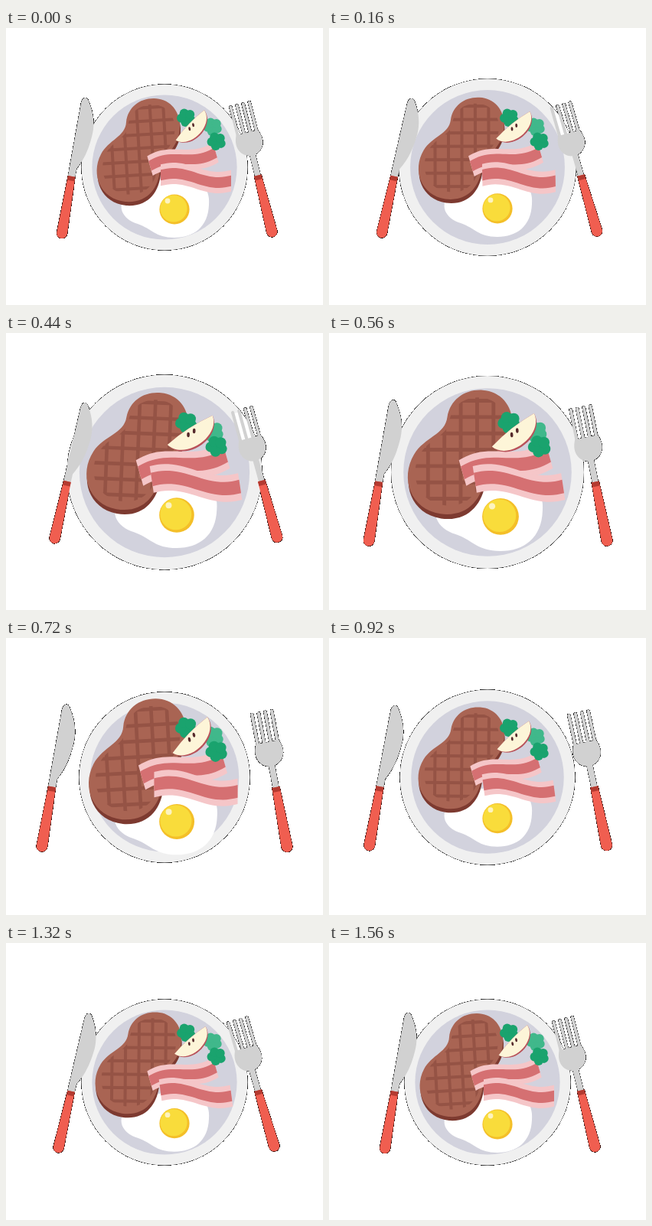
Recreate the animation shown at these times as an HTML page with a canvas. Size 414 by 362 pixels, loop 1.6 s.

```html
<!DOCTYPE html>
<html lang="en">
<head>
<meta charset="utf-8">
<title>Breakfast plate</title>
<style>
  html, body { margin: 0; height: 100%; overflow: hidden; background: #fff; }
  canvas { display: block; }
</style>
</head>
<body>
<canvas id="stage" width="414" height="362"></canvas>
<script>
const LOOP = 1600, STEP = 40;
const METAL = '#d1d1d1';
const canvas = document.getElementById('stage');
const ctx = canvas.getContext('2d', { willReadFrequently: true });

const steakShape = new Path2D('M193,92C174,92 159,104 157,123C156,142 134,146 124,165C110,192 124,224 156,227C186,229 199,208 201,186C203,166 228,158 227,126C226,106 212,92 193,92Z');
const eggWhite = new Path2D('M-5,-42C25,-47 48,-32 45,-6C44,23 25,37 0,37C-25,37 -30,25 -48,19C-68,13 -78,-5 -60,-22C-45,-37 -25,-37 -5,-42Z');
const appleSkin = new Path2D('M-27,0C-23,25 23,25 27,0Q0,-4 -27,0Z');
const appleFlesh = new Path2D('M-27,0C-22,22.5 22,22.5 27,0Q0,-4 -27,0Z');
const blade = new Path2D('M-5,110L-4,8C-3,-2 3,-2 6,4C15,18 19,32 18.5,46C17,72 12,85 5,98V110Z');
const forkHead = new Path2D('M-15,41C-23,58 -14,70 -4,72V104H4V72C14,70 23,58 15,41Z');
const forkGaps = new Path2D('M-13,4H13V43H-13Z');

// Smooth rise from a to b and smooth fall from c to d
function ease(t, from, to) {
  const u = Math.min(1, Math.max(0, (t - from) / (to - from)));
  return u * u * (3 - 2 * u);
}
const pulse = (t, a, b, c, d) => ease(t, a, b) - ease(t, c, d);

function fill(color, path) {
  ctx.fillStyle = color;
  ctx.fill(path);
}

function line(color, width, x1, y1, x2, y2) {
  ctx.strokeStyle = color;
  ctx.lineWidth = width;
  ctx.lineCap = 'round';
  ctx.beginPath();
  ctx.moveTo(x1, y1);
  ctx.lineTo(x2, y2);
  ctx.stroke();
}

function ellipse(color, x, y, rx, ry = rx, turn = 0) {
  const path = new Path2D();
  path.ellipse(x, y, rx, ry, turn, 0, 2 * Math.PI);
  fill(color, path);
}

function place(x, y, degrees, scale, draw) {
  ctx.save();
  ctx.translate(x, y);
  ctx.rotate(degrees * Math.PI / 180);
  ctx.scale(scale, scale);
  draw();
  ctx.restore();
}

function drawPlate() {
  ellipse('#f0f0f0', 0, 0, 108.5);
  ellipse('#d2d2dd', 0, 0, 94.6);
}

function drawEgg() {
  fill('#fff', eggWhite);
  ellipse('#f4bf28', 0, 0, 19.6);
  ellipse('#f9dc3b', -1, -1, 17.6);
  ellipse('#fdf3c0', -9, -11, 3.4);
}

function drawSteak() {
  place(-174.5, -152, 0, 1, () => fill('#7d3a30', steakShape));
  place(-175.5, -157, 0, 1, () => fill('#a96453', steakShape));
  // Grill marks stay inside a smaller copy of the outline
  const inset = new Path2D();
  inset.addPath(steakShape, new DOMMatrix([0.87, 0, 0, 0.87, -152.5, -137]));
  ctx.clip(inset);
  ctx.rotate(-0.06);
  for (let p = -70; p <= 70; p += 17.5) {
    line('#955345', 4, p - 2, -80, p - 2, 80);
    line('#955345', 4, -80, p, 80, p);
  }
}

function band(half) {
  const path = new Path2D();
  const y = x => 6 * Math.sin(x / 18.5);
  for (let x = -46; x <= 46; x += 4) path.lineTo(x, y(x) - half);
  for (let x = 46; x >= -46; x -= 4) path.lineTo(x, y(x) + half);
  return path;
}

function drawBacon(shear) {
  ctx.transform(1, 0, shear, 1, 0, 0);
  fill('#f5c6c8', band(14));
  fill('#d57072', band(7));
}

function drawBroccoli(color) {
  ellipse(color, 0, 0, 6);
  for (let i = 0; i < 5; i++) {
    const a = i * 2 * Math.PI / 5 + 0.5;
    ellipse(color, 6.5 * Math.cos(a), 6 * Math.sin(a), 6);
  }
}

function drawApple() {
  fill('#b9525a', appleSkin);
  fill('#fdf5d8', appleFlesh);
  for (const x of [-4, 3]) ellipse('#55292b', x, 3, 1.4, 2.5, 0.6);
}

function drawHandle(top, end) {
  fill('#f05e50', new Path2D(`M-5,${top}L-7.3,${end - 7.3}A7.3,7.3 0 0 0 7.3,${end - 7.3}L5,${top}Z`));
  fill('#b43a30', new Path2D(`M-5,${top}H5V${top + 6}H-5Z`));
}

// Cutlery turns about the middle of its length
function drawKnife() {
  ctx.translate(0, -97.5);
  fill(METAL, blade);
  drawHandle(109, 195);
}

function drawFork() {
  ctx.translate(0, -92.5);
  // Gaps show white where the fork lies on the plate
  ctx.globalCompositeOperation = 'source-atop';
  fill('#fff', forkGaps);
  ctx.globalCompositeOperation = 'source-over';
  for (let x = -12.9; x < 13; x += 8.6) line(METAL, 4.2, x, 2.5, x, 46);
  fill(METAL, forkHead);
  drawHandle(100, 185);
}

// Soft edge pixels turn opaque over black, giving the fine dotted outline
function hardenEdges() {
  const image = ctx.getImageData(0, 0, canvas.width, canvas.height), d = image.data;
  for (let i = 0; i < d.length; i += 4) {
    const a = d[i + 3];
    if (a === 0 || a === 255) continue;
    for (let c = 0; c < 3; c++) d[i + c] *= a / 255;
    d[i + 3] = a < 16 ? 0 : 255;
  }
  ctx.putImageData(image, 0, 0);
}

function render(t) {
  const plate = 1 + 0.175 * pulse(t, 0, 380, 530, 700) + 0.056 * pulse(t, 640, 800, 900, 1100);
  const swell = pulse(t, 240, 540, 640, 900);
  const food = 1 + 0.22 * swell;
  const strip = pulse(t, 80, 400, 640, 900);
  const apple = 1 + 0.3 * pulse(t, 80, 400, 560, 1000);
  const firstTilt = pulse(t, 0, 300, 400, 760);
  const secondTilt = pulse(t, 760, 900, 1320, 1560);
  const turn = 6 * firstTilt + 4 * secondTilt;
  const shear = 0.15 * pulse(t, 80, 460, 560, 720) + 0.13 * secondTilt;
  const out = pulse(t, 360, 640, 720, 1320);
  const lean = 5 * pulse(t, 0, 300, 340, 560) + 3 * pulse(t, 800, 1200, 1320, 1560);

  ctx.clearRect(0, 0, canvas.width, canvas.height);
  place(207, 182, 0, plate, drawPlate);
  place(220 + 4 * swell, 237 + 4 * swell - turn / 3, 0, food, drawEgg);
  place(175.5 - swell, 157 - 0.7 * turn - 2 * swell, turn, food, drawSteak);
  place(231, 171.5, -16, 0.95 + 0.3 * strip, () => drawBacon(0));
  place(248, 196, 0, 1 + 0.24 * strip, () => drawBacon(shear));
  place(235.5, 117, 0, food, () => drawBroccoli('#1aa36e'));
  place(270, 129, 0, food, () => drawBroccoli('#40b88b'));
  place(275, 148, 0, food, () => drawBroccoli('#1aa36e'));
  place(240.3, 126.8, 14 * firstTilt + 5 * secondTilt - 46.5, apple, drawApple);
  place(87.5 - 25.5 * out, 183, 9.6 + lean, 0.957 + 0.045 * out, drawKnife);
  place(327 + 24 * out, 185.5 + 2 * out, -14.1 - 0.7 * lean + 3.5 * out, 0.975 + 0.04 * out, drawFork);
  hardenEdges();
}

const start = performance.now();
function tick() {
  const t = (performance.now() - start) % LOOP;
  render(Math.floor(t / STEP) * STEP);
  requestAnimationFrame(tick);
}
tick();
</script>
</body>
</html>
```
